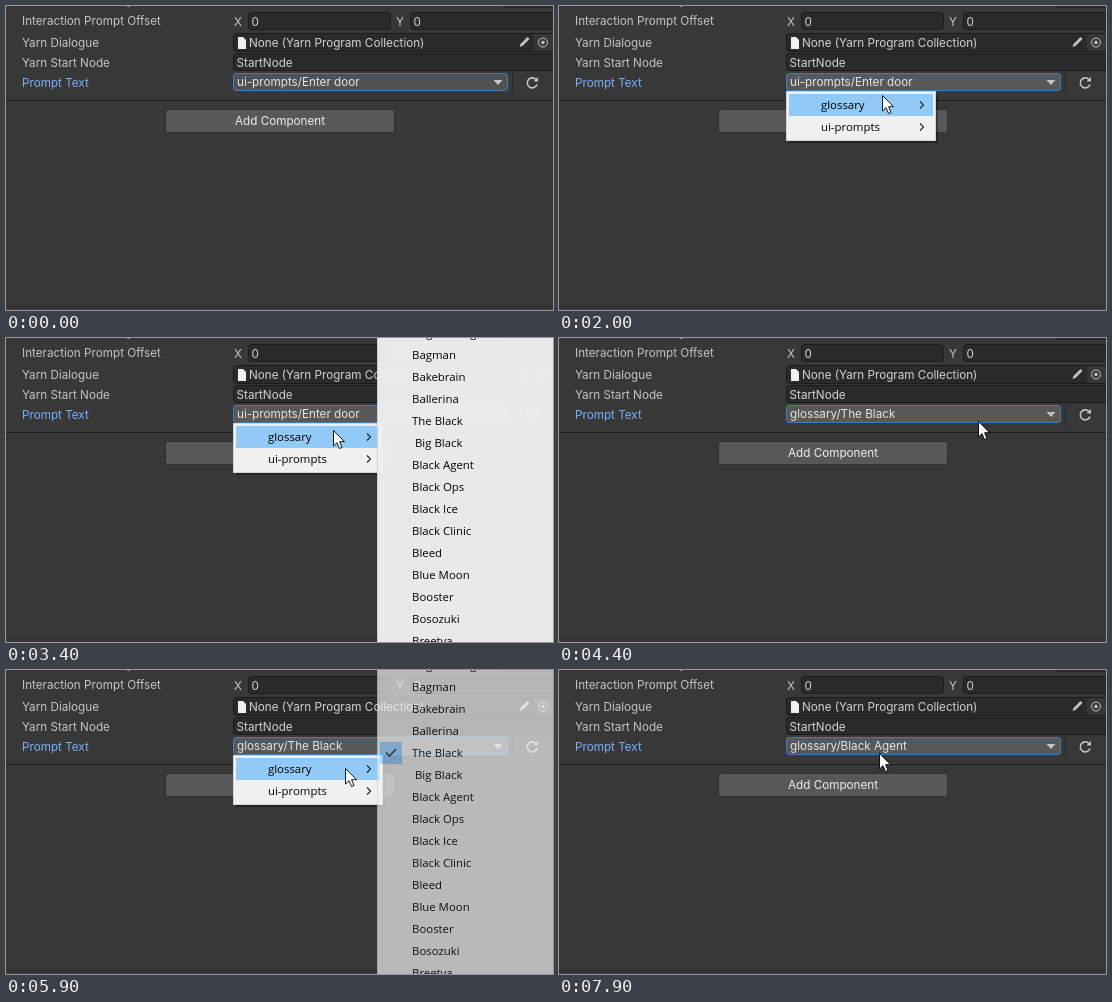
Recreate the animation shown at these times as an HTML page. Size 547x304 px, loop 8000 ms.

```html
<!DOCTYPE html>
<html lang="en">
<head>
<meta charset="utf-8">
<title>Inspector dropdown</title>
<style>
  html, body { margin: 0; height: 100%; overflow: hidden; background: #383838; }
  svg { display: block; width: 547px; height: 304px; }
  text { font: 11.7px Inter, sans-serif; fill: #d2d2d2; white-space: pre; }
  .label { fill: #c4c4c4; }
  .focus { fill: #7baefa; }
  .field { fill: #2a2a2a; stroke: #1c1c1c; }
  .menu text { font: 11.4px "Open Sans", "Noto Sans", sans-serif; fill: #000; }
  .panel { fill: #f0f0f0; stroke: #d2d2d2; }
  .shadow { fill: #000; opacity: .35; }
  .hot { fill: #91c9f7; }
  .line { fill: none; stroke: #c4c4c4; stroke-width: 1.4; }
  .mark { fill: none; stroke: #222; stroke-width: 1.1; }
  .tick { stroke-width: 1.5; }
</style>
</head>
<body>
<svg viewBox="0 0 547 304">
  <rect width="547" height="304" fill="#383838"/>
  <rect x="497" width="50" height="2" fill="#282828"/>
  <text class="label" x="16" y="-1">Can Interact Nearby</text>

  <text class="label" x="16" y="19">Interaction Prompt Offset</text>
  <text class="label" x="228" y="19.5">X</text>
  <rect class="field" x="242.5" y="6.5" width="142" height="17" rx="3"/>
  <text x="245.5" y="19.5">0</text>
  <text class="label" x="390" y="19.5">Y</text>
  <rect class="field" x="404.5" y="6.5" width="160" height="17" rx="3"/>
  <text x="407.5" y="19.5">0</text>

  <text class="label" x="16" y="41">Yarn Dialogue</text>
  <rect class="field" x="227.5" y="27.5" width="330" height="18" rx="3"/>
  <path d="M232 31h5l3 3v9h-8z" fill="#f0f0f0"/>
  <text x="243" y="41">None (Yarn Program Collection)</text>
  <path d="M513.500 41l1-3 7-7 2 2-7 7z" fill="#c4c4c4"/>
  <rect x="528" y="28" width="19" height="17" fill="#373737"/>
  <circle class="line" cx="537" cy="36.5" r="4.5" style="stroke-width:1"/>
  <circle cx="537" cy="36.5" r="1.7" fill="#c4c4c4"/>

  <text class="label" x="16" y="61">Yarn Start Node</text>
  <rect class="field" x="227.5" y="47.5" width="330" height="17" rx="3"/>
  <text x="230.5" y="61">StartNode</text>

  <text class="focus" x="16" y="81">Prompt Text</text>
  <rect id="drop" x="227.5" y="67.5" width="274" height="17" rx="2.5" stroke="#3d7dbf"/>
  <text id="value" x="231" y="80" style="fill:#e4e4e4"></text>
  <path d="M487.5 74h9l-4.5 5z" fill="#c4c4c4"/>
  <rect x="506" y="66" width="1" height="22" fill="#282828"/>
  <path class="line" d="M530 73.5A5 5 0 1 0 531 78.5" style="stroke-width:1.6"/>
  <path d="M527.5 75.5h4.5v-4.5z" fill="#c4c4c4"/>
  <rect y="94" width="547" height="1" fill="#1f1f1f"/>

  <rect id="add" x="159.5" y="103.5" width="229" height="23" rx="2.5" stroke="#303030"/>
  <text x="274" y="119" text-anchor="middle" style="fill:#eee">Add Component</text>
  <rect y="300" width="547" height="1" fill="#2b2b2b"/>

  <g class="menu" id="main">
    <rect class="shadow" x="230" y="88" width="149" height="49"/>
    <rect class="panel" x="227.5" y="85.5" width="149" height="49"/>
    <rect class="hot" id="mainHot" x="230" width="144" height="22"/>
    <text x="262" y="103">glossary</text>
    <text x="262" y="125">ui-prompts</text>
    <path class="mark" d="M361 95.5l3.5 3.5-3.5 3.5M361 117.5l3.5 3.5-3.5 3.5"/>
  </g>
  <g class="menu" id="prompts">
    <rect class="shadow" x="374" y="110" width="143" height="27"/>
    <rect class="panel" x="371.5" y="107.5" width="143" height="27"/>
    <rect class="hot" x="374" y="110" width="22" height="22"/>
    <path class="mark tick" d="M380 120.5l3.5 3.5 6.5-7"/>
    <text x="406" y="125">Enter door</text>
  </g>
  <g class="menu" id="glossary">
    <rect class="panel" x="371.5" y="-30" width="200" height="370"/>
    <rect class="hot" id="rowHot" x="374" width="180" height="22"/>
    <g id="check">
      <rect class="hot" x="374" y="72" width="22" height="22"/>
      <path class="mark tick" d="M380 82.5l3.5 3.5 6.5-7"/>
    </g>
    <g id="rows"></g>
  </g>
  <path id="cursor" d="M.5 .5V16L4 12.7 6.5 18.5 9 17.5 6.6 11.7H11.5Z" fill="#fff" stroke="#000" stroke-width=".9"/>
</svg>
<script>
const LOOP = 8000, STEP = 100;
const $ = id => document.getElementById(id);

const words = ['Augmenting', 'Bagman', 'Bakebrain', 'Ballerina', 'The Black', ' Big Black',
  'Black Agent', 'Black Ops', 'Black Ice', 'Black Clinic', 'Bleed', 'Blue Moon',
  'Booster', 'Bosozuki', 'Breetya'];
$('rows').innerHTML = words.map((w, i) => `<text x="406" y="${i * 22 - 1}">${w}</text>`).join('');

// Pointer path: time, x, y
const path = [
  [400, 571, 36], [500, 536, 42], [1100, 326, 77], [1900, 326, 77], [2000, 323, 89],
  [2200, 327, 112], [2600, 330, 113], [2800, 330, 113], [3000, 327, 92], [3600, 327, 92],
  [4100, 419, 83], [5000, 419, 83], [5300, 345, 80], [5400, 342, 80], [5800, 339, 98],
  [5900, 339, 98], [6300, 404, 107], [6400, 404, 107], [6600, 409, 120], [7300, 409, 120],
  [7600, 362, 112], [7900, 320, 83]
];

function pointer(t) {
  const i = path.findIndex(p => p[0] >= t);
  if (i < 1) return path[i < 0 ? path.length - 1 : 0].slice(1);
  const [t0, x0, y0] = path[i - 1], [t1, x1, y1] = path[i];
  const k = (t - t0) / (t1 - t0);
  return [x0 + (x1 - x0) * k, y0 + (y1 - y0) * k];
}

const clamp = v => Math.max(0, Math.min(1, v));

// Three-step fade in (eased) and fade out (linear)
function fade(t, start, end) {
  const p = clamp((t - start + STEP) / 300);
  return (1 - (1 - p) ** 3) * (1 - clamp((t - end + STEP) / 300));
}

function show(id, alpha) {
  $(id).setAttribute('opacity', alpha);
}

function draw(t) {
  const [x, y] = pointer(t);
  const inside = (l, top, r, b) => x >= l && x < r && y >= top && y < b;
  const main = fade(t, 1500, 4200) + fade(t, 5400, 7100);
  const glossary = fade(t, 3300, 4200) + fade(t, 5900, 7100);

  $('cursor').setAttribute('transform', `translate(${Math.round(x)} ${Math.round(y)})`);
  $('value').textContent = t < 4200 ? 'ui-prompts/Enter door'
    : t < 7200 ? 'glossary/The Black' : 'glossary/Black Agent';
  $('drop').setAttribute('fill', main || inside(227, 67, 502, 86) ? '#585858' : '#515151');
  $('add').setAttribute('fill', !main && inside(160, 103, 389, 127) ? '#676767' : '#585858');

  show('main', main);
  show('mainHot', glossary || y >= 88 ? 1 : 0);
  $('mainHot').setAttribute('y', glossary || y < 110 ? 88 : 110);

  show('prompts', t < 3300 ? fade(t, 2400, LOOP) : 0);
  show('glossary', glossary);
  show('check', t > 5000 ? 1 : 0);
  show('rowHot', x >= 374 ? 1 : 0);
  $('rowHot').setAttribute('y', Math.floor((y - 6) / 22) * 22 + 6);
}

const begin = performance.now();
function tick() {
  const t = (performance.now() - begin) % LOOP;
  draw(Math.floor(t / STEP) * STEP);
  requestAnimationFrame(tick);
}
tick();
</script>
</body>
</html>
```
